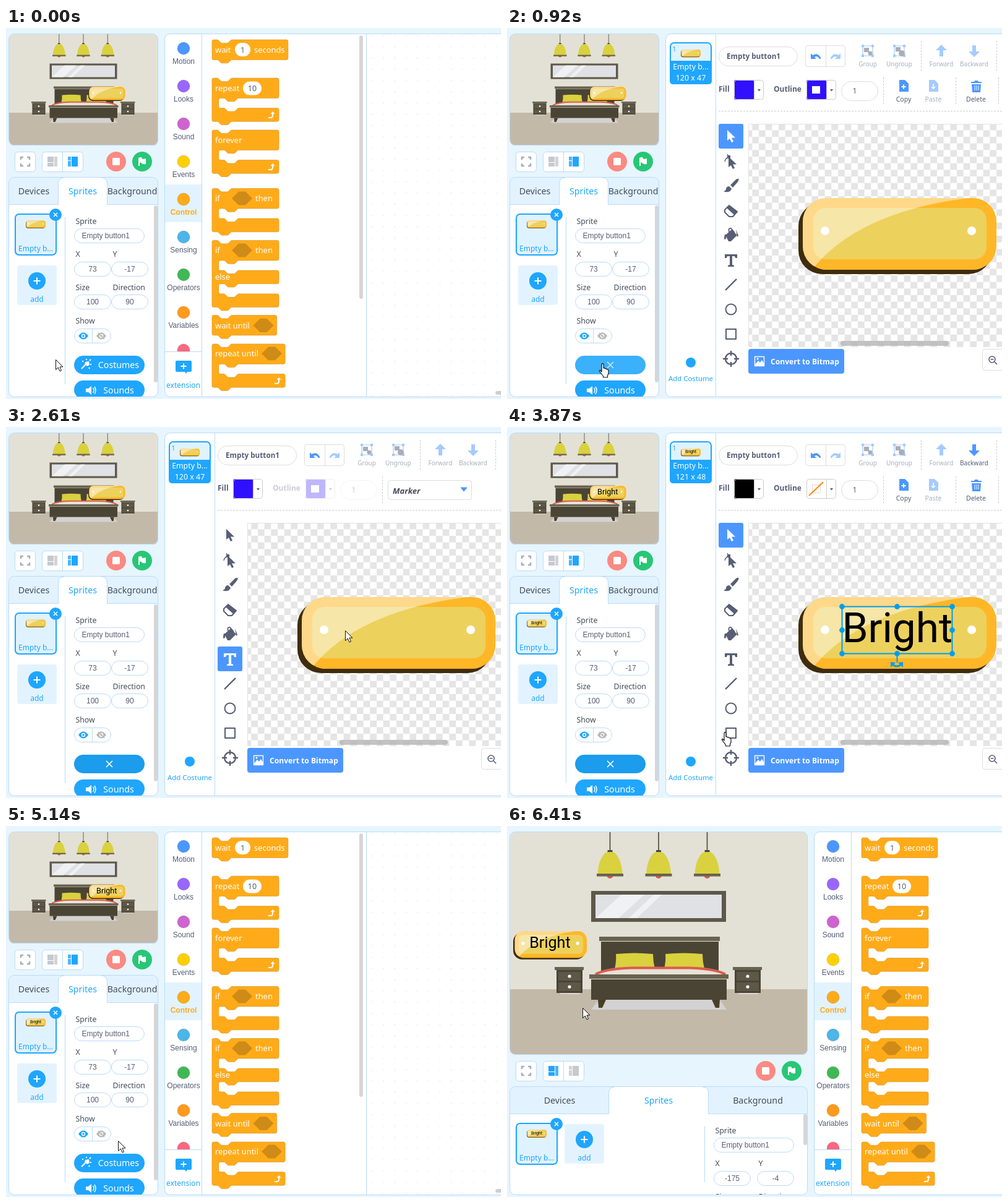
These frames come from a looping animation (800x600 px, 6.58 s). An HTML page:

```html
<!DOCTYPE html>
<html lang="en">
<head>
<meta charset="utf-8">
<title>Button costume editor</title>
<style>
html, body { margin: 0; width: 100%; height: 100%; overflow: hidden; background: #e7f5fe; }
svg { display: block; width: 800px; height: 600px; }
text { font-family: "Noto Sans", "Open Sans", sans-serif; white-space: pre; }
text.a { font-family: "Liberation Sans", Arial, sans-serif; }
text.word { font-family: Roboto, "Liberation Sans", sans-serif; }
</style>
</head>
<body>
<svg id="stage" viewBox="0 0 800 600" xmlns="http://www.w3.org/2000/svg"></svg>
<script>
const LOOP = 6580;
const BLUE = '#1fa6ff', LINE = '#b9dbfa', PALE = '#e2f3ff', INK = '#474c5c', SLATE = '#575e75',
  PAINT = '#4c97ff', ORANGE = '#ffab19', DARK = '#4a4435', WOOD = '#686350';

// Drawing helpers
const R = (x, y, w, h, fill, more = '') => `<rect x="${x}" y="${y}" width="${w}" height="${h}" fill="${fill}" ${more}/>`;
const C = (x, y, r, fill, more = '') => `<circle cx="${x}" cy="${y}" r="${r}" fill="${fill}" ${more}/>`;
const P = (d, fill, more = '') => `<path d="${d}" fill="${fill}" ${more}/>`;
const S = (d, stroke, w = 1, more = '') => P(d, 'none', `stroke="${stroke}" stroke-width="${w}" ${more}`);
const T = (x, y, s, size, fill, more = '') => `<text x="${x}" y="${y}" font-size="${size}" fill="${fill}" ${more}>${s}</text>`;
const G = (x, y, s, body, more = '') => `<g transform="translate(${x} ${y}) scale(${s})" ${more}>${body}</g>`;
const MID = 'text-anchor="middle"', MEDIUM = 'font-weight="500"';
const box = (x, y, w, h, r, stroke = LINE, fill = '#fff') => R(x + .5, y + .5, w - 1, h - 1, fill, `rx="${r}" stroke="${stroke}"`);
const plus = (x, y, r, col, w = 2) => S(`M${x - r} ${y}h${2 * r}M${x} ${y - r}v${2 * r}`, col, w);
const cross = (x, y, r, w) => S(`M${x - r} ${y - r}l${2 * r} ${2 * r}m0 ${-2 * r}l${-2 * r} ${2 * r}`, '#fff', w);

const CELL = 32 / 3;
const defs = `<defs>
<clipPath id="face"><rect x="478" y="275" width="313" height="116" rx="38"/></clipPath>
<clipPath id="room"><rect width="481" height="360" rx="16"/></clipPath>
<clipPath id="room1"><rect width="481" height="360" rx="9"/></clipPath>
<clipPath id="side0"><rect x="5" y="242" width="240" height="355" rx="9"/></clipPath>
<clipPath id="side1"><rect x="5" y="422" width="481" height="175" rx="9"/></clipPath>
<clipPath id="cats"><rect x="257" y="9" width="60" height="514"/></clipPath>
<pattern id="check" x="631" y="336" width="${2 * CELL}" height="${2 * CELL}" patternUnits="userSpaceOnUse">
${R(0, 0, 22, 22, '#fff') + R(CELL, 0, CELL, CELL, '#e5e5e5') + R(0, CELL, CELL, CELL, '#e5e5e5')}</pattern>
<pattern id="dots" x="583" y="3" width="18.2" height="18.2" patternUnits="userSpaceOnUse">${C(9, 9, .7, '#d9d9d9')}</pattern>
<g id="btn">
${R(471, 282, 313, 116, '#3f2c0d', 'rx="38"') + R(478, 275, 313, 116, '#ffb727', 'rx="38"') + R(495, 291, 280, 83, '#edd15d', 'rx="20"')}
${P('M493 391Q566 298 745 275H470V391Z', '#fff', 'opacity=".46" clip-path="url(#face)"')}
${C(514, 328, 7, '#fff') + C(751, 328, 7, '#fff')}</g>
</defs>`;

const sprite = (x, y, s) => `<g transform="translate(${x} ${y}) scale(${s}) translate(-471 -275)"><use href="#btn"/>` +
  T(541.5, 348, 'Bright', 67.5, '#000', 'class="word"') + '</g>';

function bedroom() {
  const lamp = x => S(`M${x} 9V40`, '#48443a', 1.6) + R(x - 4, 39, 8, 4, '#48443a') + C(x, 80, 5, '#dc5a50') +
    P(`M${x - 20} 78C${x - 19} 58 ${x - 12} 45 ${x - 5} 42H${x + 5}C${x + 12} 45 ${x + 19} 58 ${x + 20} 78Z`, '#d9d13d') +
    R(x - 21.5, 77, 43, 4.5, WOOD);
  const table = x => R(x - 15, 268, 32, 4, '#dcd9d6') + R(x - 21, 233, 42, 37, DARK) + R(x - 24, 228, 47, 5, WOOD) +
    [236, 253].map(y => R(x - 18, y, 36, 14, '#5d5748') + C(x, y + 7, 2.6, '#fff')).join('');
  const pillow = x => P(`M${x} 231Q${x + 3} 218 ${x + 2} 207Q${x + 32} 204 ${x + 62} 207Q${x + 62} 219 ${x + 65} 231Z`, '#d9d13d');
  return R(5, 9, 482, 256, '#e3e1d5') + R(5, 264, 482, 110, '#c3b9a9') + [166.5, 245, 323.5].map(lamp).join('') +
    R(136, 105, 218, 50, '#5e584b') + R(143, 111, 204, 38, '#dfe1e5') +
    P('M143 149L185 111H222L180 149ZM197 149L237 111H250L210 149Z', '#f0f1f3') +
    R(149, 179, 195, 7, WOOD) + R(152, 187, 190, 56, DARK) + pillow(174) + pillow(254) +
    P('M142 241Q155 232 200 230H296Q340 232 355 241Z', '#e6e2d6') +
    S('M143 240Q158 231 200 229.5H296Q338 231 353 240', '#dc5a50', 4) +
    P('M136 297L148 281H344L355 297Z', '#d3d2d2') + R(133, 240, 225, 7, WOOD) + R(136, 248, 219, 33, DARK) +
    P('M147 281H160L154 294H148ZM344 281H331L337 294H343Z', '#4a3d28') + table(101) + table(389);
}

function stageArea(large) {
  const k = large ? 1 : .5, w = 480 * k, h = 360 * k;
  const pos = large ? [5, 160, .372] : [256, 170, .372];
  return G(5, 10, k, `<g clip-path="url(#room${large ? 1 : ''})"><g transform="translate(-5 -10)">${bedroom()}</g>${sprite(...pos)}</g>`) +
    R(4.5, 9.5, w + 1, h, 'none', `rx="9" stroke="${LINE}"`);
}

function stageBar(large) {
  const gray = '#c5c9cf', on = large ? BLUE : gray, off = large ? gray : BLUE;
  const x = large ? 418 : 178;
  return box(14, 200, 34, 33, 5) + S('M24 213v-4h4M34 209h4v4M38 219v4h-4M28 223h-4v-4', '#a9b0b8', 2.6) +
    box(58, 200, 67, 33, 5) + S('M91.5 200V233', LINE) +
    R(67, 208, 10, 9, on) + R(67, 218, 10, 6, on) + R(78, 208, 5, 16, on, 'opacity=".8"') +
    R(100, 208, 5, 6, off, 'opacity=".8"') + R(100, 215, 5, 9, off, 'opacity=".8"') + R(106, 208, 10, 16, off) +
    C(x, 216, 16, '#fa8a82') + R(x - 6, 210, 12, 12, '#fff', 'rx="1.5"') +
    C(x + 42, 216, 16, '#27c777') + P(`M${x + 36} 210q4-2 6 0v2q3 0 6-1v9q-4 1-7-1v-1q-2-1-3 0v5h-2z`, '#fff');
}

function tabs(large, dy) {
  const e = large ? [5, 165, 325, 486] : [5, 85, 163, 245], y = 242 + dy;
  const names = ['Devices', 'Sprites', 'Background'];
  return R(e[0], y, e[3] - e[0], 44, PALE) +
    P(`M${e[1]} ${y + 45}V${y + 9}Q${e[1]} ${y} ${e[1] + 9} ${y}H${e[2] - 9}Q${e[2]} ${y} ${e[2]} ${y + 9}V${y + 45}Z`, '#fff') +
    S(`M${e[0]} ${y + 43.5}H${e[1] - .5}V${y + 9}Q${e[1]} ${y} ${e[1] + 9} ${y}M${e[2] - 9} ${y}Q${e[2]} ${y} ${e[2] + .5} ${y + 9}V${y + 43.5}H${e[3]}`, LINE) +
    names.map((n, i) => T((e[i] + e[i + 1]) / 2, y + 27, n, 14.2, i == 1 ? BLUE : INK, MID)).join('');
}

function form(large, dy) {
  const x = large ? 334 : 110, x2 = large ? 404 : 170, y = dy;
  const label = (lx, ly, s) => T(lx + 2.5, ly + y, s, 12.3, INK);
  const field = (fx, fy, w, s) => box(fx, fy + y, w, 24, 12) + T(fx + w / 2, fy + y + 16, s, 12, SLATE, `class="a" ${MID}`);
  const s = label(x, 317, 'Sprite') + box(x, 324 + y, large ? 130 : 114, 24, 12) +
    T(x + 12.5, 340 + y, 'Empty button1', 12, SLATE, 'class="a"') + label(x, 370, 'X') + label(x2, 370, 'Y') +
    field(x, 378, 60, large ? '-175' : '73') + field(x2, 378, 60, large ? '-4' : '-17') +
    label(x, 424, 'Size') + label(x2, 424, 'Direction');
  if (large) return s;
  const eye = (cx, col) => P(`M${cx - 8} 498q8-11 16 0q-8 11-16 0z`, col) + C(cx, 498, 3.2, '#fff') + C(cx, 498, 1.8, col);
  return s + field(x, 431, 60, '100') + field(x2, 431, 60, '90') + label(x, 478, 'Show') +
    box(110, 486, 60, 24, 12) + S('M139.5 486V510', LINE) + eye(125, BLUE) + eye(154, '#b8b8b8') + S('M149 493l10 10', '#b8b8b8', 1.4) +
    R(110, 530, 114, 30, BLUE, 'rx="15" id="costumes"') +
    `<g class="coding">${T(182, 550, 'Costumes', 14.2, '#fff', `${MID} ${MEDIUM}`) +
      S('M122 551L131 542M130 537v-2M136 544h2M135 538l2-2M125 539h-2M134 549l1 2', '#fff', 2) + P('M128 540l6-1 1 6-4 2-4-4z', '#fff')}</g>` +
    `<g class="editor" id="close">${cross(167, 545, 5, 1.7)}</g>` +
    R(110, 570, 114, 30, BLUE, 'rx="15"') + T(182, 591, 'Sounds', 14.2, '#fff', `${MID} ${MEDIUM}`) +
    P('M129 583h4l5-4v14l-5-4h-4z', '#fff') + S('M140.5 582q3 4 0 8M143 580q4 6 0 12', '#fff', 1.4);
}

function side(large) {
  const dy = large ? 180 : 0, ax = large ? 75 : 0, ay = large ? 98 : 0;
  return stageArea(large) + G(0, dy, 1, stageBar(large)) +
    `<g clip-path="url(#side${+large})">` + R(5, 242 + dy, 482, 360, '#fff') + tabs(large, dy) +
    G(0, dy, 1, R(15, 301, 66, 66, '#dff2ff', `rx="6" stroke="${BLUE}" stroke-width="2"`) + sprite(32, 311.5, .1) +
      T(48, 361, 'Empty b...', 12, BLUE, MID) + C(80, 302, 10, BLUE) + cross(80, 302, 3, 1.5)) +
    G(ax, ay, 1, R(18, 384, 64, 64, PALE, 'rx="4"') + C(50, 409, 14, BLUE) + plus(50, 409, 5.5, '#fff') + T(50, 443, 'add', 12, BLUE, MID)) +
    (large ? S('M319.5 486V576', LINE) + R(479, 466, 6, 50, '#d4d6d8', 'rx="3"')
      : S('M95.5 306V576', LINE) + R(239, 287, 6, 286, '#d4d6d8', 'rx="3"')) + form(large, dy) + '</g>' +
    R(4.5, 241.5 + dy, large ? 481 : 241, 355 - dy, 'none', `rx="9" stroke="${LINE}"`);
}

// Blocks are drawn in their own units and scaled
const NOTCH = 'c2 0 3 1 4 2l4 4c1 1 2 2 4 2h12c2 0 3-1 4-2l4-4c1-1 2-2 4-2';
const BACK = 'c-2 0-3 1-4 2l-4 4c-1 1-2 2-4 2h-12c-2 0-3-1-4-2l-4-4c-1-1-2-2-4-2';
const MOUTH = `H64${BACK}h-8a4 4 0 0 0-4 4v16a4 4 0 0 0 4 4h8${NOTCH}`;
function block(y, w, mouths = 0) {
  let d = `M0 4a4 4 0 0 1 4-4h8${NOTCH}H${w - 4}a4 4 0 0 1 4 4v40a4 4 0 0 1-4 4`;
  for (let i = 0; i < mouths; i++) d += `${MOUTH}H${w - 4}a4 4 0 0 1 4 4v24a4 4 0 0 1-4 4`;
  return G(333, y, .675, P(d + `H48${BACK}H4a4 4 0 0 1-4-4Z`, ORANGE, 'stroke="#d8962a"'));
}
const word = (x, y, s) => T(x, y, s, 12.9, '#fff', MEDIUM);
const hex = (x, y) => P(`M${x} ${y}l11-11h11l11 11-11 11h-11z`, '#cf8b17');
const slot = (x, y, w, s) => R(x, y, w, 22, '#fff', 'rx="11"') + T(x + w / 2, y + 15.5, s, 12.5, SLATE, MID);
const turn = (x, y) => S(`M${x} ${y + 4}h4q3 0 3-4v-2`, '#fff', 2) + P(`M${x + 3.5} ${y - 2}l3.5-4 3.5 4z`, '#fff');

function coding() {
  const cats = [['Motion', '#4c97ff'], ['Looks', '#9966ff'], ['Sound', '#cf63cf'], ['Events', '#ffd000'], ['Control', ORANGE],
    ['Sensing', '#4cb5e9'], ['Operators', '#40b855'], ['Variables', '#ff9a1c'], ['', '#ff6680']];
  return box(256, 9, 700, 588, 9) + R(257, 253, 60, 61, PALE) +
    `<g clip-path="url(#cats)">` + cats.map(([n, col], i) => C(287, 33 + 61 * i, 10, col, 'stroke="#0002"') +
      T(287, 58 + 61 * i, n, 12, i == 4 ? ORANGE : SLATE, `class="a" ${MID}` + (i == 4 ? ' font-weight="700"' : ''))).join('') + '</g>' +
    S('M257 523.5H316M316.5 9V597', LINE) + P('M276 538h22q2 0 2 2v14q0 2-2 2h-5l-2 3-2-3h-13q-2 0-2-2v-14q0-2 2-2z', BLUE) +
    plus(287, 547, 4.5, '#fff') + T(286.5, 582, 'extension', 12, BLUE, MID) +
    block(19, 182) + word(338, 40, 'wait') + slot(370, 24, 25, 1) + word(401, 40, 'seconds') +
    block(81, 160, 1) + word(338, 102, 'repeat') + slot(383, 86.5, 30, 10) + turn(424, 141) +
    block(165, 160, 1) + word(338, 186, 'forever') + turn(424, 225) +
    block(259.5, 160, 1) + word(338, 280, 'if') + hex(365, 275.5) + word(403, 280, 'then') +
    block(343.5, 160, 2) + word(338, 364, 'if') + hex(365, 359.5) + word(403, 364, 'then') + word(338, 407, 'else') +
    block(464.5, 155) + word(338, 486, 'wait until') + hex(399.5, 481) +
    block(511, 175, 1) + word(338, 531, 'repeat until') + hex(413, 526.5) + turn(434, 571) +
    R(571, 12, 6, 426, '#d4d6d8', 'rx="3"') + R(583, 10, 360, 587, 'url(#dots)') + S('M582.5 9V597', LINE) +
    R(791, 587, 20, 6, '#cecece', 'rx="3"');
}

// Costume editor
const tip = (x, y, s, col = SLATE, size = 10) => T(x, y, s, size, col, MID);
const dash = d => S(d, '#ccc', 1, 'stroke-dasharray="3 2"');
const bold = (x, y, s) => T(x, y, s, 12, SLATE, 'font-weight="700"');
const arrow = (x, dir, col) => P(`M${x} ${37 - 10 * dir}l9 ${9 * dir}h-6v${10 * dir}h-6v${-10 * dir}h-6z`, col);
const well = (x, body) => body + box(x, 84, 48, 32, 4, '#ccc', 'none') + S(`M${x + 32.5} 84V116`, '#ccc') + P(`M${x + 38} 99h5l-2.5 3.5z`, SLATE);
const square = (x, y, s) => S(`M${x - s} ${y - s}h${2 * s}v${2 * s}h${-2 * s}z`, PAINT, 1.2);

function tools() {
  const at = i => 175 + 40 * i;
  const st = (d, w = 2.4) => S(d, SLATE, w, 'stroke-linejoin="round"');
  const pointer = (x, y, col) => P(`M${x} ${y}v17l4-3 3 6 3-1.5-3-6h6z`, col);
  const letter = col => P('M352 366h20v6h-3l-1-3h-4v14l3 1v2h-10v-2l3-1v-14h-4l-1 3h-3z', col);
  return R(342, 155, 40, 40, PAINT, 'rx="3" class="pick"') + R(342, 355, 40, 40, PAINT, 'rx="3" class="type"') +
    `<g class="pick">${pointer(356, 165, '#fff') + letter(SLATE)}</g><g class="type">${pointer(356, 165, SLATE) + letter('#fff')}</g>` +
    pointer(358, 208, SLATE) + st('M352 216q1-6 8-8M356 204l5 9', 1.4) + R(356, 206, 5, 5, SLATE) +
    P('M374 244q-2-1-6 3l-7 7 4 4 7-8q4-5 2-6zM359 256l4 4q-2 5-6 5-4 1-7-1 4-1 4-4 1-4 5-4z', SLATE) +
    st('M352 294l7-7 13 10-7 8h-6l-7-7z', 2) + P('M359 287l13 10-5 5-12-11z', SLATE) +
    P('M353 335l10-9 9 9-10 10h-4z', SLATE) + st('M359 330q-2-7 3-6l6 7', 1.8) + P('M352 334q-2 7 0 8 3 0 2-8zM370 326l2 12 2-2z', SLATE) +
    st(`M353 ${at(6) + 9}l18-18`) + C(362, at(7), 8.5, 'none', `stroke="${SLATE}" stroke-width="2"`) +
    st(`M354 ${at(8) - 8}h16v16h-16z`, 2) + C(362, at(9), 9, 'none', `stroke="${SLATE}" stroke-width="2.4"`) +
    st(`M362 ${at(9) - 13}v8m0 10v8M349 ${at(9)}h8m10 0h8`);
}

function selection() {
  const xs = [541.5, 630.5, 719.5], ys = [290.5, 328.5, 366.5], col = '#009dec';
  const knobs = xs.flatMap((x, i) => ys.map((y, j) => i == 1 && j == 1 ? '' : C(x, y, 4.4, col))).join('');
  return S('M541.5 290.5h178v76h-178zM630.5 367V381', col, 2) + knobs +
    S('M623 384q7 6 14 0', col, 3) + P('M620 389v-9l8 1zM640 389v-9l-8 1z', col);
}

function editor() {
  const soft = '#a9b0bf', mild = '#a5cbff';
  const groupIcon = x => square(x, 37, 8) + [-8, 8].map(a => [-8, 8].map(b => R(x + a - 2, 35 + b, 4, 4, PAINT)).join('')).join('');
  const page = (x, col, inner) => P(`M${x - 7} 84h9l6 6v13h-15z`, col) + inner;
  return box(256, 9, 700, 588, 9) + S('M337.5 9V597', LINE) +
    R(264, 24, 66, 66, '#dff2ff', `rx="6" stroke="${BLUE}" stroke-width="2"`) + P('M263 53h68v32q0 6-6 6h-56q-6 0-6-6z', BLUE) +
    T(267.5, 38, '1', 10.5, BLUE) + sprite(281, 35, .1) + T(297, 67, 'Empty b...', 12.4, '#fff', `${MID} ${MEDIUM}`) +
    T(297, 85, '120 x 47', 12.4, '#fff', `id="size" ${MID} ${MEDIUM}`) + C(297, 541, 8, BLUE) +
    T(297, 571, 'Add Costume', 11.4, BLUE, `${MID} ${MEDIUM}`) +
    box(342, 30, 128, 32, 16, '#ddd') + T(355, 50, 'Empty button1', 11.7, SLATE, 'font-weight="600"') +
    box(482, 28, 65, 35, 4, '#ddd') + S('M515.5 28V62', '#ddd') +
    P('M491 41v9h9l-3-3q4-3 8 3 3 0 2-2-5-9-13-4z', PAINT) + P('M539 41v9h-9l3-3q-4-3-8 3-3 0-2-2 5-9 13-4z', mild) +
    `<g opacity=".5">${groupIcon(583) + R(577, 32, 8, 7, SLATE) + C(587, 41, 3.5, SLATE) + groupIcon(634) + R(628, 31, 8, 7, SLATE) + C(638, 41, 5, SLATE)}</g>` +
    tip(583, 62, 'Group', soft) + tip(634, 62, 'Ungroup', soft) + arrow(702, 1, mild) + tip(702, 62, 'Forward', soft) +
    `<g class="plain">${arrow(755, -1, mild) + tip(755, 62, 'Backward', soft)}</g><g class="word">${arrow(755, -1, PAINT) + tip(755, 62, 'Backward')}</g>` +
    dash('M669.5 21V70M791.5 21V70M608.5 80V124M342 134.5H800') +
    bold(342, 103, 'Fill') + well(367, R(367, 84, 32, 32, '#3010ff', 'rx="3" id="fill"')) +
    `<g id="outline">${bold(431, 103, 'Outline') +
      well(484, `<g class="plain">${R(484, 84, 32, 32, '#3010ff', 'rx="3"') + R(493, 94, 13, 12, '#fff')}</g><g class="word">` +
        S('M493.5 93.5h13v13h-13z', '#e3d7c9') + S('M488 111L511 89', '#ff8c1a', 2.2) + '</g>') +
      box(540, 86, 60, 32, 16, '#ddd') + T(562, 106, '1', 12, SLATE, MID)}</g>` +
    `<g class="pick">${page(641, PAINT, plus(641, 95, 3.5, '#fff')) + tip(641, 119, 'Copy', SLATE, 10.5) +
      page(689, mild, S('M689 90v8m-3-3l3 3 3-3', '#fff', 1.6)) + tip(689, 119, 'Paste', soft, 10.5) +
      P('M750 87h5l1-2h5l1 2h5v2h-17zM751 91h15l-1 13h-13z', PAINT) + S('M756 93v8m3-8v8m3-8v8', '#fff') + tip(758, 119, 'Delete', SLATE, 10.5) +
      dash('M725.5 80V124M794.5 80V124')}</g>` +
    `<g class="type">${box(617, 86, 136, 32, 4, '#ddd') + T(625, 108, 'Marker', 13, INK, 'font-weight="800" font-style="italic"') +
      P('M735 98h10l-5 6z', PAINT, `stroke="${PAINT}" stroke-linejoin="round"`)}</g>` + tools() +
    R(390, 156, 420, 360, 'url(#check)') + S('M390.5 516V155.5H800', '#e3e3e3') +
    sprite(471, 275, 1) + `<g class="word">${selection()}</g>` +
    `<g id="caret">${S('M537 274h5v79h-5z', '#a9c8ee') + S('M539.5 280V347', '#000')}</g>` +
    R(539, 506, 175, 8, '#b9b9b9', 'rx="4" opacity=".85"') + R(390, 519, 155, 40, PAINT, 'rx="4"') +
    S('M400.5 531.5h15v15h-15z', '#fff', 1.4, 'stroke-linejoin="round"') + P('M401 544l5-6 3 3 3-4 4 7v3h-15z', '#fff') + C(405, 535, 1.5, '#fff') +
    T(426, 543.5, 'Convert to Bitmap', 12.1, '#fff', 'font-weight="700"') +
    box(768, 519, 60, 35, 4, '#ddd') + C(784, 536, 5, 'none', `stroke="${SLATE}" stroke-width="1.6"`) + S('M788 540l4 4M781.5 536h5', SLATE, 1.6);
}

const pointerArt = P('M.5 .5V16.5L4.3 13L7 19L9.5 18L7 12H12Z', '#fff', 'stroke="#111" stroke-linejoin="round" id="arrow"') +
  P('M5 14V2.5Q5 .7 6.5 .7T8 2.5V8Q9 7 10.5 9 12 8 13 10 15.5 9.3 16 12V17L14.5 20V23H7.5V21L2 14Q.5 11.5 2.5 11.5Z', '#fff',
    'stroke="#111" stroke-width="1.2" stroke-linejoin="round" id="hand"');

document.getElementById('stage').innerHTML = defs + R(0, 0, 800, 600, '#e7f5fe') +
  `<g id="small">${side(false)}</g><g id="large">${side(true)}</g>` +
  `<g id="coding">${coding()}</g><g class="editor">${editor()}</g><g id="cursor">${pointerArt}</g>`;

const $ = s => document.querySelectorAll(s);
const [fill, outline, size, cursor, costumes, close, codingArea] =
  ['fill', 'outline', 'size', 'cursor', 'costumes', 'close', 'coding'].map(id => document.getElementById(id));
const show = (sel, on) => $(sel).forEach(n => n.style.display = on ? '' : 'none');

// time, x, y, hand
const path = [[0, 80, 536], [170, 88, 538], [260, 108, 543], [350, 134, 548, 1], [440, 146, 545, 1], [530, 148, 542, 1],
  [1020, 156, 538, 1], [1110, 190, 508], [1200, 232, 468], [1300, 275, 425], [1390, 308, 392], [1490, 323, 376],
  [1580, 332, 373], [1670, 348, 371, 1], [1770, 354, 370, 1], [2050, 364, 367, 1], [2140, 384, 364],
  [2270, 415, 358], [2360, 465, 346], [2450, 515, 336], [2530, 540, 331], [2610, 548, 329],
  [3180, 445, 397], [3540, 412, 438], [3630, 385, 470], [3870, 346, 493, 1], [3910, 318, 515], [4010, 275, 540],
  [4100, 238, 552], [4200, 205, 546, 1], [4290, 188, 541, 1], [4390, 177, 538, 1], [4950, 179, 532, 1], [5050, 181, 518],
  [5140, 181, 509], [5220, 87, 194], [5750, 90, 201], [5840, 97, 222], [5940, 106, 246], [6030, 113, 266],
  [6120, 118, 280], [6220, 121, 288], [6310, 122, 292], [6410, 122, 294]];
const tints = [[0, BLUE], [350, '#3bb0fb'], [1110, '#2ba6f3'], [1300, '#1b9cec'], [4200, '#26a2f0'], [4950, BLUE]];
const last = (list, t) => list.filter(s => s[0] <= t).pop();

function render(t) {
  const editing = t >= 860 && t < 4950, typing = t >= 1860 && t < 3180, done = t >= 3180, large = t >= 5220;
  show('#small', !large);
  show('#large', large);
  show('#coding, .coding', !editing);
  show('.editor', editing);
  show('.word', done);
  show('.plain', !done);
  show('.type', typing);
  show('.pick', !typing);
  show('#caret', t >= 2800 && t < 3180);
  codingArea.setAttribute('transform', `translate(${large ? 240 : 0} 0)`);
  fill.setAttribute('fill', done ? '#000' : '#3010ff');
  outline.setAttribute('opacity', typing ? .3 : 1);
  size.textContent = done ? '121 x 48' : '120 x 47';
  costumes.setAttribute('fill', last(tints, t)[1]);
  close.setAttribute('opacity', t < 1020 ? .7 : 1);
  const [, x, y, hand] = last(path, t);
  cursor.setAttribute('transform', `translate(${x} ${y})`);
  show('#arrow', !hand);
  show('#hand', hand);
}

const start = performance.now();
(function tick() {
  render((performance.now() - start) % LOOP);
  requestAnimationFrame(tick);
})();
</script>
</body>
</html>
```
